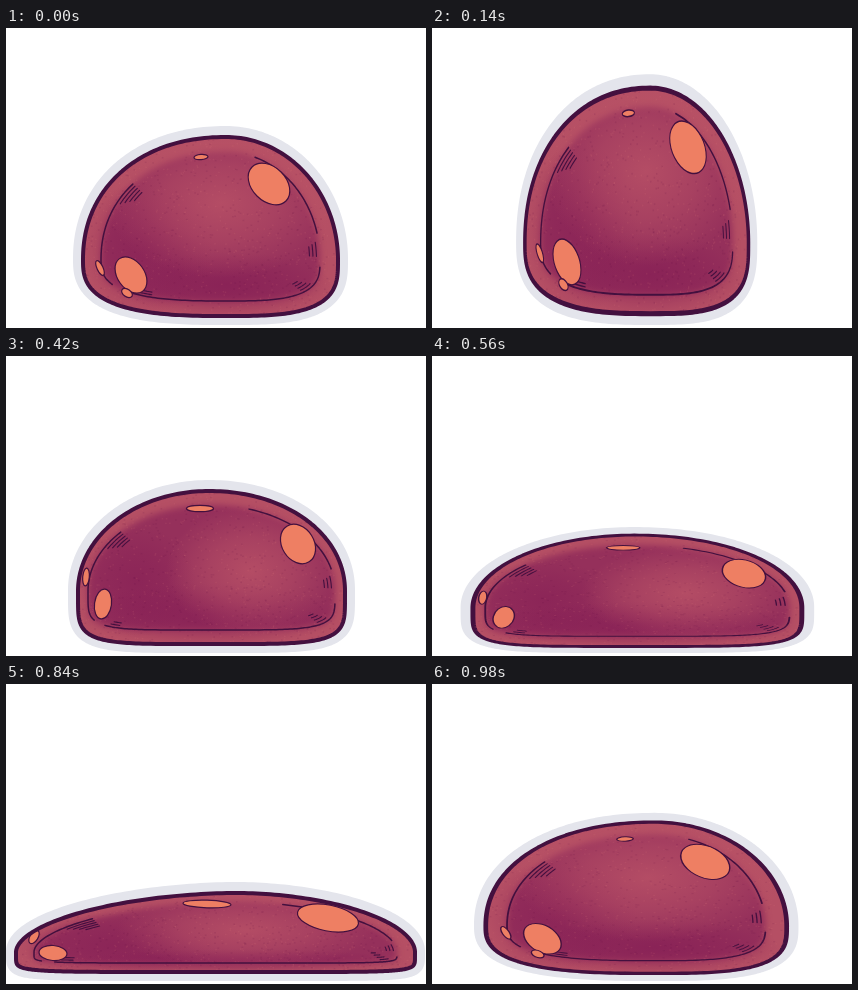
Recreate the animation shown at these times as an HTML page with a canvas. Size 420x300 px, loop 1.12 s.

```html
<!DOCTYPE html>
<html lang="en">
<head>
<meta charset="utf-8">
<title>Bouncing jelly</title>
<style>
html, body { margin: 0; width: 100%; height: 100%; overflow: hidden; background: #fff; }
canvas { display: block; width: 420px; height: 300px; }
</style>
</head>
<body>
<canvas id="stage" width="420" height="300"></canvas>
<script>
const ctx = document.getElementById('stage').getContext('2d');
const INK = '#43103f', RIM = '#b54f64', CORE = '#95305b', SPOT = '#ee7f63', HALO = '#e4e5ec';
const DARK = '130,26,84', LIGHT = '190,86,104';
const STEP = 140, TURN = Math.PI * 2;
const MIDDLE = 206, FLOOR = 297;

// Each body is four superellipse quarters around x, y, reaching left, right, top, bottom.
// n: exponents of the quarters, clockwise from lower right. taper: narrowing at the foot.
// pad: distance of the inner line. light: lit patch. spots: x, y, rx, ry, tilt.
const dome = {
  x: 220, y: 232, l: 143, r: 112, t: 123, b: 56, n: [3.2, 2.8, 2.15, 2], taper: [0, 0],
  pad: [18, 15], light: [215, 175, 115, 75],
  spots: [[263, 156, 24, 17, 45], [125, 247, 20, 13.5, 55], [195, 129, 7, 2.6, -4],
    [94, 240, 3, 8, -25], [121, 265, 6, 3.8, 35]]
};
const tall = {
  x: 205, y: 165, l: 88, r: 79, t: 140, b: 122, n: [12, 12, 2, 2.1], taper: [0.4, 0.27],
  pad: [16, 13], light: [228, 150, 58, 120],
  spots: [[244, 78, 14.5, 22, -12], [161, 245, 13, 19.5, -22], [196, 43.5, 9.5, 3.6, -6],
    [131, 209, 3.8, 9.5, -4], [148, 262, 3.6, 5.5, -20]]
};
const squat = {
  x: 203, y: 235, l: 131, r: 136, t: 100, b: 53, n: [5, 5, 2, 2.05], taper: [0, 0],
  pad: [10, 14], light: [245, 215, 85, 65],
  spots: [[292, 188, 16, 21, -32], [97, 248, 8.5, 15, 8], [194, 152.5, 13.5, 3.2, 0],
    [80, 221, 3.3, 9, 5]]
};
const flat = {
  x: 230, y: 268, l: 220, r: 179, t: 59, b: 20, n: [7, 7, 1.85, 1.9], taper: [0, 0],
  pad: [18, 9], light: [240, 246, 130, 38],
  spots: [[322, 234, 31, 13, 11], [47, 269, 14, 7.5, 4], [201, 220, 24, 3.8, 2],
    [28, 253, 4, 7.5, 32]]
};

// Drawing, width and height factor
const POSES = [
  [dome, 1, 1], [dome, 0.877, 1.26], [tall, 1, 1], [squat, 1, 1],
  [squat, 1.232, 0.728], [flat, 0.993, 1], [flat, 1, 1], [dome, 1.18, 0.845]
];

// Part of the outline, from turn a to turn b, moved inwards by dx, dy
function arc(s, a = 0, b = 1, dx = 0, dy = 0) {
  const path = new Path2D(), count = Math.ceil(240 * (b - a));
  for (let i = 0; i <= count; i++) {
    const turn = a + (b - a) * i / count;
    const c = Math.cos(turn * TURN), k = Math.sin(turn * TURN);
    const power = 2 / s.n[Math.floor(turn % 1 * 4)];
    const u = Math.abs(c) ** power, v = Math.abs(k) ** power;
    const foot = k > 0 ? 1 - s.taper[c < 0 ? 0 : 1] * v ** 2.5 : 1;
    const x = s.x + (c < 0 ? dx - s.l : s.r - dx) * u * foot;
    const y = s.y + (k < 0 ? dy - s.t : s.b - dy) * v;
    path.lineTo(x, y);
  }
  return path;
}

function stroke(path, width, color = INK) {
  ctx.lineWidth = width;
  ctx.strokeStyle = color;
  ctx.stroke(path);
}

// Short strokes side by side, following the inner line
function hatch(s, turn, span, count) {
  const [dx, dy] = s.pad;
  for (let i = 1; i <= count; i++) {
    const a = turn + i * span * 0.12;
    stroke(arc(s, a, a + span * (1 - i * 0.14), dx + i * 3.5, dy + i * 2.5), 1.1);
  }
}

function spot([x, y, rx, ry, deg]) {
  const path = new Path2D();
  path.ellipse(x, y, rx, ry, deg / 360 * TURN, 0, TURN);
  ctx.fillStyle = SPOT;
  ctx.fill(path);
  stroke(path, 1.2);
}

function tone(x, y, rx, ry, rgb, alpha) {
  ctx.save();
  ctx.translate(x, y);
  ctx.scale(rx, ry);
  const g = ctx.createRadialGradient(0, 0, 0, 0, 0, 1);
  g.addColorStop(0, `rgba(${rgb},${alpha})`);
  g.addColorStop(0.5, `rgba(${rgb},${alpha * 0.6})`);
  g.addColorStop(1, `rgba(${rgb},0)`);
  ctx.fillStyle = g;
  ctx.fillRect(-1, -1, 2, 2);
  ctx.restore();
}

// Faint pigment flecks
function flecks(s) {
  let seed = 7;
  const rnd = () => (seed = seed * 16807 % 2147483647) / 2147483647;
  for (let i = 0; i < 1100; i++) {
    ctx.fillStyle = i % 2 ? 'rgba(90,12,66,.12)' : 'rgba(222,120,125,.12)';
    ctx.fillRect(s.x - s.l + rnd() * (s.l + s.r), s.y - s.t + rnd() * (s.t + s.b), 1.6, 1.4);
  }
}

function paint(s) {
  const shape = arc(s), [dx, dy] = s.pad;
  ctx.save();
  ctx.translate(0, -1);
  stroke(shape, 20, HALO);
  ctx.restore();
  ctx.fillStyle = RIM;
  ctx.fill(shape);

  ctx.save();
  ctx.clip(shape);
  ctx.filter = 'blur(3px)';
  ctx.fillStyle = CORE;
  ctx.fill(arc(s, 0, 1, dx, dy));
  ctx.filter = 'none';
  tone(s.x - s.l * 0.55, s.y - s.t * 0.1, s.l * 0.45, s.t * 0.55, DARK, 0.5);
  tone(s.x, s.y + s.b * 0.45, s.r * 0.95, s.b * 0.6, DARK, 0.6);
  tone(...s.light, LIGHT, 0.75);
  flecks(s);
  ctx.restore();

  stroke(arc(s, 0.42, 0.62, dx, dy), 1.5);
  stroke(arc(s, 0.8, 0.96, dx, dy), 1.5);
  stroke(arc(s, 1.01, 1.37, dx, dy), 1.5);
  hatch(s, 0.58, 0.04, 4);
  hatch(s, 0.97, 0.025, 3);
  hatch(s, 0.07, 0.05, 4);
  hatch(s, 0.33, 0.03, 2);
  s.spots.forEach(spot);
  stroke(shape, 4);
}

function show([shape, w, h]) {
  ctx.setTransform(1, 0, 0, 1, 0, 0);
  ctx.fillStyle = '#fff';
  ctx.fillRect(0, 0, 420, 300);
  ctx.setTransform(w, 0, 0, h, MIDDLE * (1 - w), FLOOR * (1 - h));
  ctx.lineCap = ctx.lineJoin = 'round';
  paint(shape);
}

let start = null, current = -1;
function tick(now) {
  if (start === null) start = now;
  const i = Math.floor((now - start) / STEP) % POSES.length;
  if (i !== current) show(POSES[current = i]);
  requestAnimationFrame(tick);
}
show(POSES[0]);
requestAnimationFrame(tick);
</script>
</body>
</html>
```
